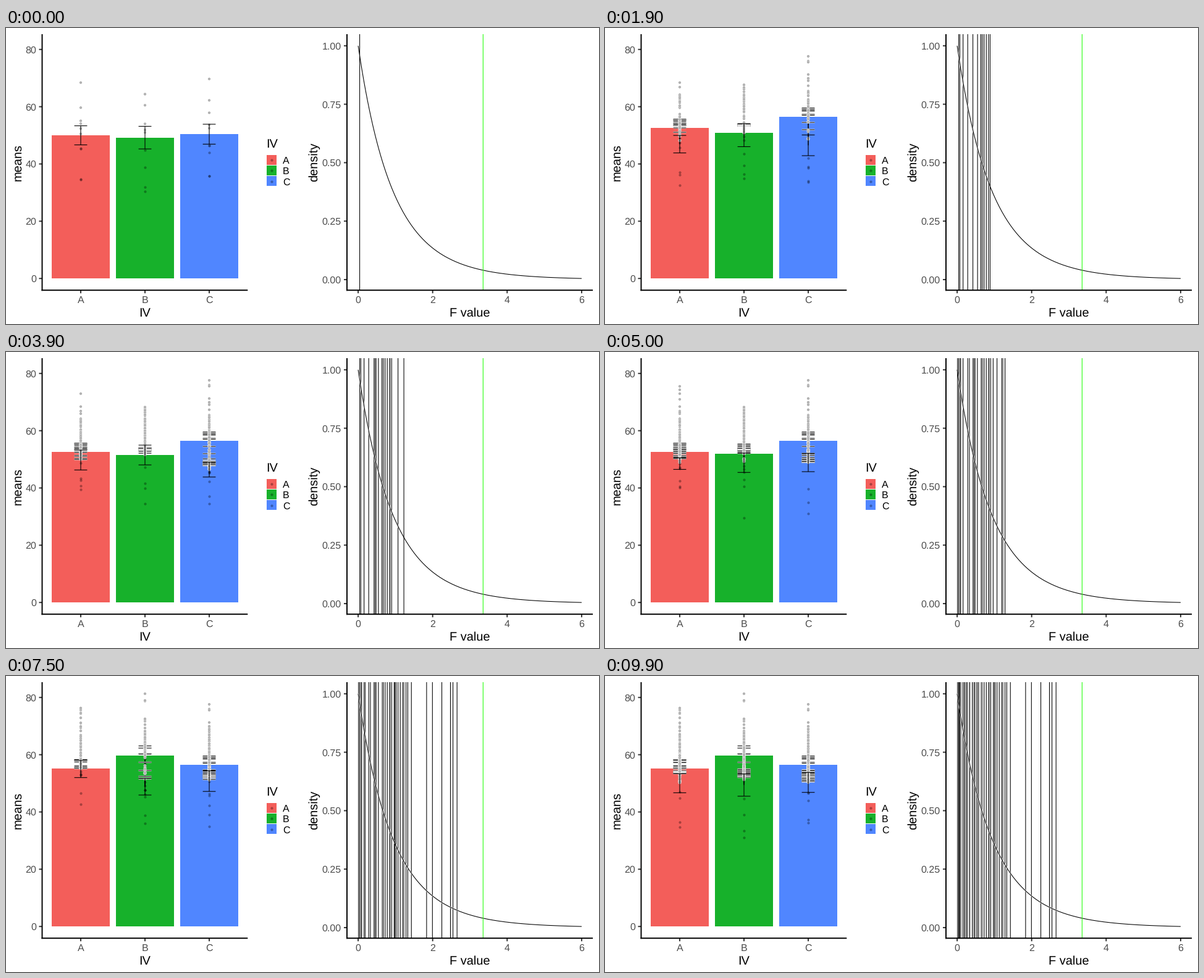
Write a matplotlib script that moves like this. It is 960x480 px and loops after 10 s.

```python
import numpy as np
import matplotlib.pyplot as plt
from matplotlib.animation import FuncAnimation
from matplotlib.collections import LineCollection
from matplotlib.patches import Rectangle

plt.rcParams.update({"font.family": "Liberation Sans", "text.hinting": "none"})

PX = 0.75  # points per pixel at 96 dpi
FRAMES, HOLD = 100, 10
COLORS = ("#F35E5A", "#17B12B", "#5086FF")
CENTERS = np.array([121.0, 225.0, 329.0])
INK = (0, 0, 0, 0.25)

# Ten simulated experiments: the F statistic and the group means of A, B, C
F_KEYS = np.array([0.041, 0.665, 0.90, 0.425, 1.285, 0.01, 2.655, 1.02, 0.545, 0.27])
MEAN_KEYS = np.array([
    (50.0, 49.2, 50.4), (52.6, 50.9, 56.4), (46.5, 50.0, 45.8), (46.4, 46.0, 45.1),
    (50.0, 51.9, 46.5), (48.5, 48.8, 48.9), (55.0, 59.7, 48.7), (55.2, 48.7, 51.0),
    (52.3, 50.3, 47.7), (50.5, 52.0, 49.2),
])
# Highest scores: experiment, group, score
PEAKS = ((1, 2, 77.6), (4, 0, 75.5), (6, 1, 81.3), (7, 0, 76.3))


def simulate():
    """Ten normal scores per group, centred on the group mean."""
    rng = np.random.default_rng(4)
    dev = np.clip(rng.normal(0, 11, (10, 3, 10)), -18, 16)
    scores = MEAN_KEYS[..., None] + dev - dev.mean(axis=2, keepdims=True)
    for s, g, peak in PEAKS:
        scores[s, g, scores[s, g].argmax()] = peak
    return scores, scores.std(axis=2, ddof=1) / np.sqrt(10)


def step(f):
    """Experiment, and sine-eased share of the way to the next one."""
    s = f // HOLD
    k, n = (f - 3, 7) if s == 0 else (f % HOLD - 4, 6)
    return s, (1 - np.cos(np.pi * max(0, k) / n)) / 2


def tween(keys):
    out = []
    for f in range(FRAMES):
        s, e = step(f)
        out.append(keys[s] * (1 - e) + keys[(s + 1) % len(keys)] * e)
    return np.array(out)


score_keys, se_keys = simulate()
SCORES, SE, MEAN, FSTAT = (tween(k) for k in (score_keys, se_keys, MEAN_KEYS, F_KEYS))
LOW, HIGH = MEAN - SE, MEAN + SE
DISTINCT = [f for f in range(FRAMES) if f % HOLD == 0 or step(f)[1] > 0]


def bar_y(v):
    return 406.2 - 4.643 * v


def f_x(v):
    return 570.1 + 60.3 * v


def dens_y(v):
    return 408.0 - 379.2 * v


fig = plt.figure(figsize=(10, 5), dpi=96, facecolor="white")
ax = fig.add_axes([0, 0, 1, 1])
ax.set(xlim=(0, 960), ylim=(480, 0))
ax.axis("off")


def line(xs, ys, color="black", width=1.07, z=5):
    ax.plot(xs, ys, color=color, lw=width * PX, zorder=z, solid_capstyle="butt", snap=False)


def label(x, y, s, size=16, color="black", ha="center", rotation=0):
    ax.text(x, y, s, fontsize=size * PX, color=color, ha=ha, va="baseline",
            rotation=rotation, rotation_mode="anchor", zorder=9)


def axes_frame(x0, x1, xticks, yticks, xtitle, ytitle, ytitle_x):
    line([x0, x0], [10, 426.2], width=1.95, z=8)
    line([x0 - 1, x1], [425.2, 425.2], width=1.95, z=8)
    for x, s in xticks:
        line([x, x], [425.2, 430.2], "#333333", 1.95, 7)
        label(x, 446, s, color="#4D4D4D")
    for y, s in yticks:
        line([x0 - 5, x0], [y, y], "#333333", 1.95, 7)
        label(x0 - 9, y + 5.8, s, color="#4D4D4D", ha="right")
    label((x0 + x1) / 2, 468, xtitle, 20)
    label(ytitle_x, 217.6, ytitle, 20, rotation=90)


def segments(z, halo=False):
    """Black lines; with a halo each one is preceded by a wider white one."""
    colors, widths = (["white", "black"], [2.4, 1.07]) if halo else (["black"], [1.07])
    lines = LineCollection([], colors=colors, linewidths=[w * PX for w in widths],
                           zorder=z, snap=False)
    return ax.add_collection(lines)


def dots(z, halo=False):
    d = ax.scatter([], [], zorder=z)
    faces, sizes, widths = [INK], [3.3], [0.9]
    if halo:
        faces, sizes, widths = [(1, 1, 1, 1), INK], [4.8, 3.3], [0, 0.9]
    d.set_facecolor(faces)
    d.set_edgecolor(faces)
    d.set_sizes([(s * PX) ** 2 for s in sizes])
    d.set_linewidths([w * PX for w in widths])
    return d


# Static parts
axes_frame(58.5, 391.3, list(zip(CENTERS, "ABC")),
           [(bar_y(v), str(v)) for v in range(0, 81, 20)], "IV", "means", 24.3)
axes_frame(552, 950, [(f_x(v), str(v)) for v in range(0, 7, 2)],
           [(dens_y(v), f"{v:.2f}") for v in np.arange(0, 1.1, 0.25)],
           "F value", "density", 504.3)

label(421.5, 194, "IV", 20, ha="left")
key_y = 213.7 + 17.28 * np.arange(3)
for y, name, color in zip(key_y, "ABC", COLORS):
    ax.add_patch(Rectangle((422, y - 8), 16, 16, fc=color, lw=0, zorder=2))
    label(448, y + 6.2, name, ha="left")
dots(3).set_offsets([(430, y + 0.4) for y in key_y])

# F density with 2 and 27 degrees of freedom, and its critical value
grid = np.linspace(0, 6, 240)
curve = f_x(grid), dens_y((1 + 2 * grid / 27) ** -14.5)
line(*curve, "white", 2.2, 3)
line(*curve)
line([f_x(3.354)] * 2, [10, 425], "#21FF06", z=6)

# Moving parts
bars = [ax.add_patch(Rectangle((c - 47, 0), 94, 0, fc=col, lw=0, zorder=1))
        for c, col in zip(CENTERS, COLORS)]
inner_dots = dots(2)
stems = segments(2.5)
caps = segments(3, halo=True)
outer_dots = dots(4, halo=True)
error_bars = segments(5)
old_f = segments(2, halo=True)
new_f = segments(4)


def cap(x, v):
    return [(x - 10.4, bar_y(v)), (x + 10.4, bar_y(v))]


def stem(x, v0, v1):
    return [(x, bar_y(v0)), (x, bar_y(v1))]


def f_line(v):
    return [(f_x(v), 10), (f_x(v), 425)]


def update(f):
    past = [i for i in DISTINCT if i < f]
    shown = past + [f]

    # Marks stay behind until a later bar covers them
    top = np.maximum.accumulate(MEAN[f::-1])[::-1]
    cut = np.vstack([top[1:], np.zeros((1, 3))])

    for bar, h in zip(bars, top[0]):
        bar.set_y(bar_y(h))
        bar.set_height(bar_y(0) - bar_y(h))

    pts = SCORES[shown]
    xy = np.stack([np.broadcast_to(CENTERS[:, None], pts.shape), bar_y(pts)], axis=-1)
    seen = pts > cut[shown][..., None]
    above = pts > MEAN[shown][..., None]
    inner_dots.set_offsets(xy[seen & ~above])
    outer_dots.set_offsets(np.repeat(xy[seen & above], 2, axis=0))

    stem_segs, cap_segs = [], []
    for i in past:
        for x, lo, hi, c in zip(CENTERS, LOW[i], HIGH[i], cut[i]):
            if hi > c:
                stem_segs.append(stem(x, max(lo, c), hi))
                cap_segs += [cap(x, hi)] * 2
            if lo > c:
                stem_segs.append(cap(x, lo))
    stems.set_segments(stem_segs)
    caps.set_segments(cap_segs)

    now = []
    for x, lo, hi in zip(CENTERS, LOW[f], HIGH[f]):
        now += [stem(x, lo, hi), cap(x, lo), cap(x, hi)]
    error_bars.set_segments(now)

    old_f.set_segments([f_line(FSTAT[i]) for i in past for _ in range(2)])
    new_f.set_segments([f_line(FSTAT[f])])
    return []


anim = FuncAnimation(fig, update, frames=FRAMES, interval=100, repeat=True, repeat_delay=0)
plt.show()
```
